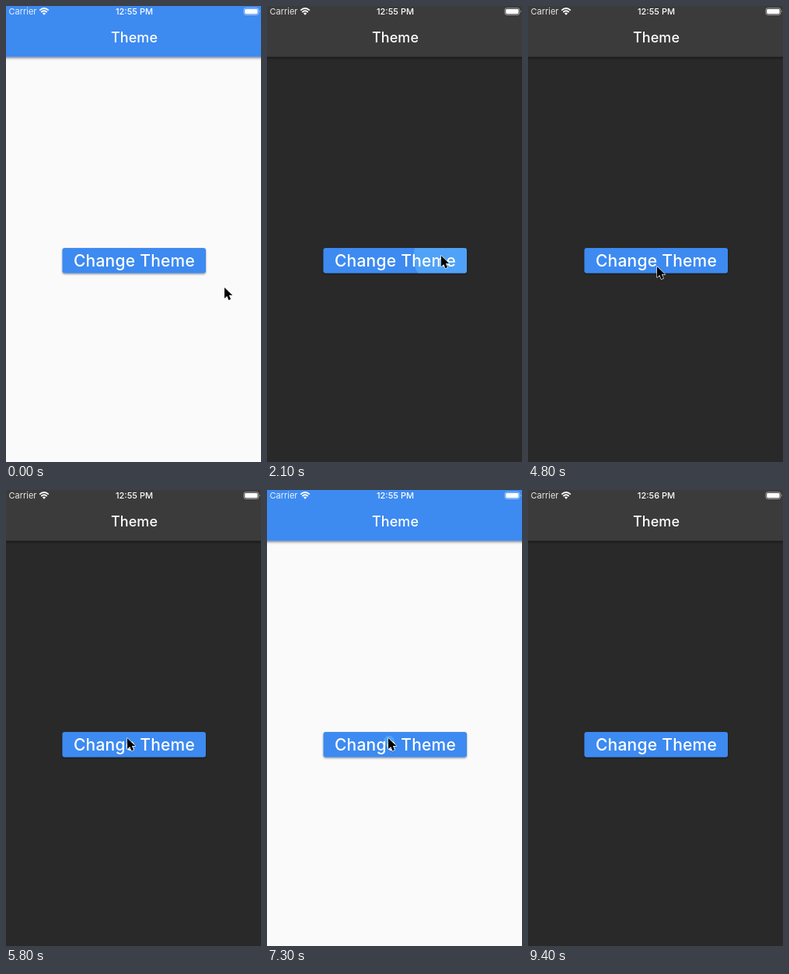
An HTML page for the animation above (9600 ms loop, 328 by 588 pixels).

```html
<!DOCTYPE html>
<html lang="en">
<head>
<meta charset="utf-8">
<title>Theme</title>
<style>
  html, body { margin: 0; width: 100%; height: 100%; overflow: hidden; background: #fafafa; }
  svg { display: block; width: 328px; height: 588px; cursor: default; }
  text { font-family: Inter, Roboto, sans-serif; font-weight: 500; fill: #fff; user-select: none; }
  .status { font-size: 11px; }
  .carrier { font-weight: 400; fill-opacity: .88; }
  #title { font-size: 18px; letter-spacing: .1px; }
  #label { font-size: 21px; letter-spacing: .25px; }
</style>
</head>
<body>
<svg viewBox="0 0 328 588">
  <defs>
    <filter id="barShadow" x="-5%" y="-20%" width="110%" height="150%">
      <feDropShadow dx="0" dy="1.5" stdDeviation="1.8" flood-opacity=".5"/>
    </filter>
    <filter id="btnShadow" x="-5%" y="-20%" width="110%" height="150%">
      <feDropShadow dx="0" dy="1.2" stdDeviation="1" flood-opacity=".45"/>
    </filter>
    <clipPath id="btnClip"><rect x="72.5" y="312" width="184.5" height="32.5" rx="3"/></clipPath>
  </defs>

  <rect id="page" width="328" height="588"/>
  <rect id="bar" x="-10" y="-10" width="348" height="75.5" filter="url(#barShadow)"/>
  <text id="title" x="165" y="47" text-anchor="middle">Theme</text>

  <text class="status carrier" x="3.5" y="11">Carrier</text>
  <g fill="none" stroke="#fff" stroke-width="1.8">
    <path d="M43.2 5.6Q49 .4 54.8 5.6M45.3 8Q49 4.6 52.7 8"/>
    <path d="M46.9 9.4Q49 7.6 51.1 9.4L49 11.7Z" fill="#fff" stroke="none"/>
  </g>
  <text id="clock" class="status" x="165" y="11" text-anchor="middle">12:55 PM</text>
  <rect x="306" y="2.8" width="18.8" height="8.6" rx="2.4" fill="none" stroke="#fff" stroke-opacity=".5"/>
  <rect x="307.2" y="4" width="16.4" height="6.2" rx="1.4" fill="#fff"/>
  <path d="M326 5.6Q327.4 7.1 326 8.6Z" fill="#fff" fill-opacity=".6"/>

  <rect x="72.5" y="312" width="184.5" height="32.5" rx="3" fill="#3c8af1" filter="url(#btnShadow)"/>
  <g clip-path="url(#btnClip)"><circle id="ripple" fill="#64bfff"/></g>
  <text id="label" x="165" y="336" text-anchor="middle">Change Theme</text>

  <path id="pointer" d="M0 0V14L3.3 11L5.5 16.2L8.1 15.1L5.9 10.1H10.3Z"
    stroke="#fff" stroke-width="1.2" stroke-linejoin="round" paint-order="stroke"/>
</svg>
<script>
const LOOP = 9600, STEP = 100;
const FADE_HOLD = 150, FADE = 250, THEME_TIME = 200;
const LIGHT = 250, DARK = 41, SURFACE = 255, DARK_SURFACE = 58;

// time, x, y
const track = [
  [0, 281, 363], [500, 224, 322], [3850, 224, 322], [4800, 166, 336],
  [5250, 180, 199], [5800, 156, 320], [7550, 156, 320], [8000, 318, 600]
];
// touch x, down, up
const presses = [
  [225, 780, 1150], [225, 1860, 2680], [225, 2815, 3800],
  [157, 5870, 6190], [157, 7230, 7360]
];
// start, becomes dark
const switches = [[1158, true], [6193, false], [7380, true]];

const el = id => document.getElementById(id);
const set = (id, attrs) => {
  for (const k in attrs) el(id).setAttribute(k, attrs[k]);
};
const clamp = v => Math.min(1, Math.max(0, v));
const mix = (a, b, p) => a + (b - a) * p;
const smooth = p => p * p * (3 - 2 * p);
const gray = v => `rgb(${Array(3).fill(Math.round(v)).join()})`;

function darkness(t) {
  let d = 0;
  for (const [start, dark] of switches) {
    if (t < start) break;
    const p = clamp((t - start) / THEME_TIME);
    d = dark ? p : 1 - p;
  }
  return d;
}

function pointerAt(t) {
  const i = track.findIndex(k => k[0] > t);
  if (i < 0) return track[track.length - 1].slice(1);
  const [a, b] = [track[i - 1], track[i]];
  const p = smooth((t - a[0]) / (b[0] - a[0]));
  return [mix(a[1], b[1], p), mix(a[2], b[2], p)];
}

function drawRipple(t) {
  const press = presses.filter(p => p[1] <= t).pop();
  if (!press) return set("ripple", { r: 0 });
  const [x, down, up] = press;
  const y = 324;
  const full = Math.hypot(Math.max(x - 72.5, 257 - x), 20.5);
  const held = full * (Math.min(t, up) - down) / 1000;
  const r = Math.min(full, held + Math.max(0, t - up) * 0.6);
  const opacity = 0.45 * (1 - clamp((t - up - FADE_HOLD) / FADE));
  set("ripple", { cx: x, cy: y, r, opacity });
}

function draw(t) {
  const d = darkness(t);
  const isDark = d >= 0.5;
  set("page", { fill: gray(mix(LIGHT, DARK, d)) });
  // the bar colour flips with the theme's brightness halfway through
  set("bar", { fill: isDark ? gray(mix(SURFACE, DARK_SURFACE, d)) : "#3c8af1" });
  el("title").style.fill = isDark ? gray(255 - 335 * (1 - d)) : "#fff";
  el("clock").textContent = t < 9400 ? "12:55 PM" : "12:56 PM";
  drawRipple(t);
  set("pointer", { transform: `translate(${pointerAt(t)})` });
}

function tick() {
  const t = performance.now() % LOOP;
  draw(Math.floor(t / STEP) * STEP);
  requestAnimationFrame(tick);
}
tick();
</script>
</body>
</html>
```
